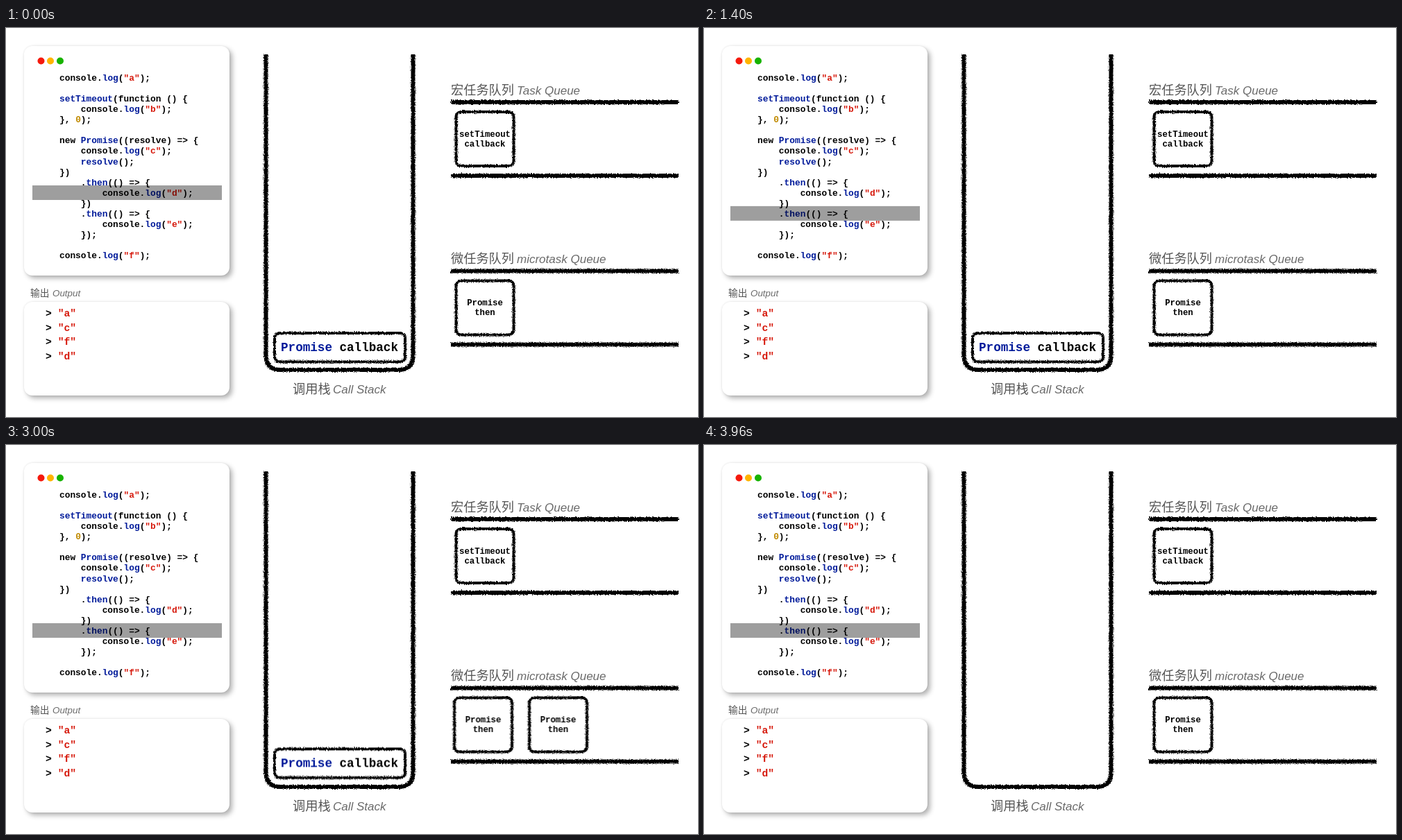
Animation, 997 px wide and 561 px high, one loop 4.44 s. Source, as an HTML page:

```html
<!DOCTYPE html>
<html lang="zh">
<head>
<meta charset="utf-8">
<title>Event loop</title>
<style>
  html, body { margin: 0; width: 100%; height: 100%; overflow: hidden; background: #fff; }
  .stage { position: relative; width: 997px; height: 561px; overflow: hidden; }
  .stage > * { position: absolute; margin: 0; }
  .panel {
    left: 26px; width: 296px; border-radius: 12px; background: #fff;
    box-shadow: 4px 4px 7px rgba(0, 0, 0, .3), 0 0 3px rgba(0, 0, 0, .1);
  }
  pre, .mono { font-family: "Courier New", "Liberation Mono", monospace; font-weight: 700; }
  pre { color: #000; }
  .code { left: 77px; top: 65px; font-size: 12.85px; line-height: 15.06px; }
  .out { left: 57px; top: 402px; font-size: 14.7px; line-height: 20.7px; }
  pre i, pre b, pre u { font: inherit; text-decoration: none; }
  pre i { color: #001a9a; }
  pre b { color: #d6180b; }
  pre u { color: #c08a00; }
  .bar { left: 38px; top: 227px; width: 273px; height: 21px; background: rgba(0, 0, 0, .38); }
  svg { left: 0; top: 0; }
  .label { font: 300 18.2px "Noto Sans CJK SC", "Noto Sans CJK", sans-serif; fill: #555; }
  .label tspan { font-family: "Liberation Sans", Arial, sans-serif; font-style: italic; font-size: 17px; fill: #6a6a6a; }
  .label.small { font-size: 13.7px; }
  .label.small tspan { font-size: 13.4px; }
  .rough { fill: none; stroke: #000; filter: url(#chalk); }
  .line { stroke-width: 6; }
  .box { fill: #fff; stroke-width: 4; }
  .mono { font-size: 12.3px; text-anchor: middle; }
  .mono.big { font-size: 17.6px; }

  .bar, .first, .second, .call { animation: 4440ms linear infinite; }
  .bar { animation-name: bar; }
  .first { animation-name: first; }
  .second { animation-name: second; }
  .call { animation-name: call; }

  @keyframes bar {
    0%, 10.81% { transform: none; animation-timing-function: cubic-bezier(.37, 0, .63, 1); }
    32.43%, 100% { transform: translateY(30px); }
  }
  @keyframes first {
    0%, 67.12% { transform: none; animation-timing-function: cubic-bezier(.35, 0, .65, .86); }
    79.39%, 100% { transform: translateX(-740px); }
  }
  @keyframes call {
    0%, 67.12% { transform: none; animation-timing-function: cubic-bezier(.35, 0, .65, .86); }
    79.39%, 100% { transform: translateY(-488px); }
  }
  @keyframes second {
    0%, 39.08% { transform: translateX(354px); animation-timing-function: cubic-bezier(.61, 1, .88, 1); }
    50.45%, 67.39% { transform: translateX(105.5px); animation-timing-function: cubic-bezier(.37, 0, .63, 1); }
    88.02%, 100% { transform: none; }
  }
</style>
</head>
<body>
<div class="stage">
  <div class="panel" style="top:26px;height:331px"></div>
  <div class="panel" style="top:395px;height:135px"></div>

<pre class="code">console.<i>log</i>(<b>"a"</b>);

<i>setTimeout</i>(function () {
    console.<i>log</i>(<b>"b"</b>);
}, <u>0</u>);

new <i>Promise</i>((resolve) =&gt; {
    console.<i>log</i>(<b>"c"</b>);
    <i>resolve</i>();
})
    .<i>then</i>(() =&gt; {
        console.<i>log</i>(<b>"d"</b>);
    })
    .<i>then</i>(() =&gt; {
        console.<i>log</i>(<b>"e"</b>);
    });

console.<i>log</i>(<b>"f"</b>);</pre>

<pre class="out">&gt; <b>"a"</b>
&gt; <b>"c"</b>
&gt; <b>"f"</b>
&gt; <b>"d"</b></pre>

  <div class="bar"></div>

  <svg width="997" height="561" viewBox="0 0 997 561">
    <defs>
      <filter id="chalk" filterUnits="userSpaceOnUse" x="0" y="0" width="997" height="561" color-interpolation-filters="sRGB">
        <feTurbulence type="fractalNoise" baseFrequency=".6" numOctaves="2" seed="4"/>
        <feDisplacementMap in="SourceGraphic" scale="4" xChannelSelector="R" yChannelSelector="G"/>
      </filter>
      <g id="then">
        <rect class="rough box" x="648.5" y="364.5" width="83" height="78" rx="7"/>
        <text class="mono" x="690" y="400">Promise</text>
        <text class="mono" x="690" y="414">then</text>
      </g>
    </defs>

    <circle cx="50.5" cy="47.5" r="5" fill="#f5190d"/>
    <circle cx="64" cy="47.5" r="5" fill="#ffb400"/>
    <circle cx="78" cy="47.5" r="5" fill="#17b300"/>

    <text class="label small" x="35" y="387">输出<tspan x="67">Output</tspan></text>
    <text class="label" x="641" y="95.5">宏任务队列<tspan x="736">Task Queue</tspan></text>
    <text class="label" x="641" y="339">微任务队列<tspan x="736">microtask Queue</tspan></text>
    <text class="label" x="413" y="527">调用栈<tspan x="471">Call Stack</tspan></text>

    <path class="rough line" d="M374.5 38V472Q374.5 493 396 493H565Q586.5 493 586.5 472V38"/>
    <path class="rough line" d="M641 107H969M641 213H969M641 350.5H969M641 456.5H969"/>

    <rect class="rough box" x="648.5" y="121" width="83" height="78" rx="7"/>
    <text class="mono" x="690" y="157">setTimeout</text>
    <text class="mono" x="690" y="171">callback</text>

    <g class="call">
      <rect class="rough box" x="387" y="440" width="188" height="41.5" rx="7"/>
      <text class="mono big" x="480.5" y="466"><tspan fill="#001a9a">Promise</tspan> callback</text>
    </g>
    <g class="second"><use href="#then"/></g>
    <g class="first"><use href="#then"/></g>
  </svg>
</div>
</body>
</html>
```
